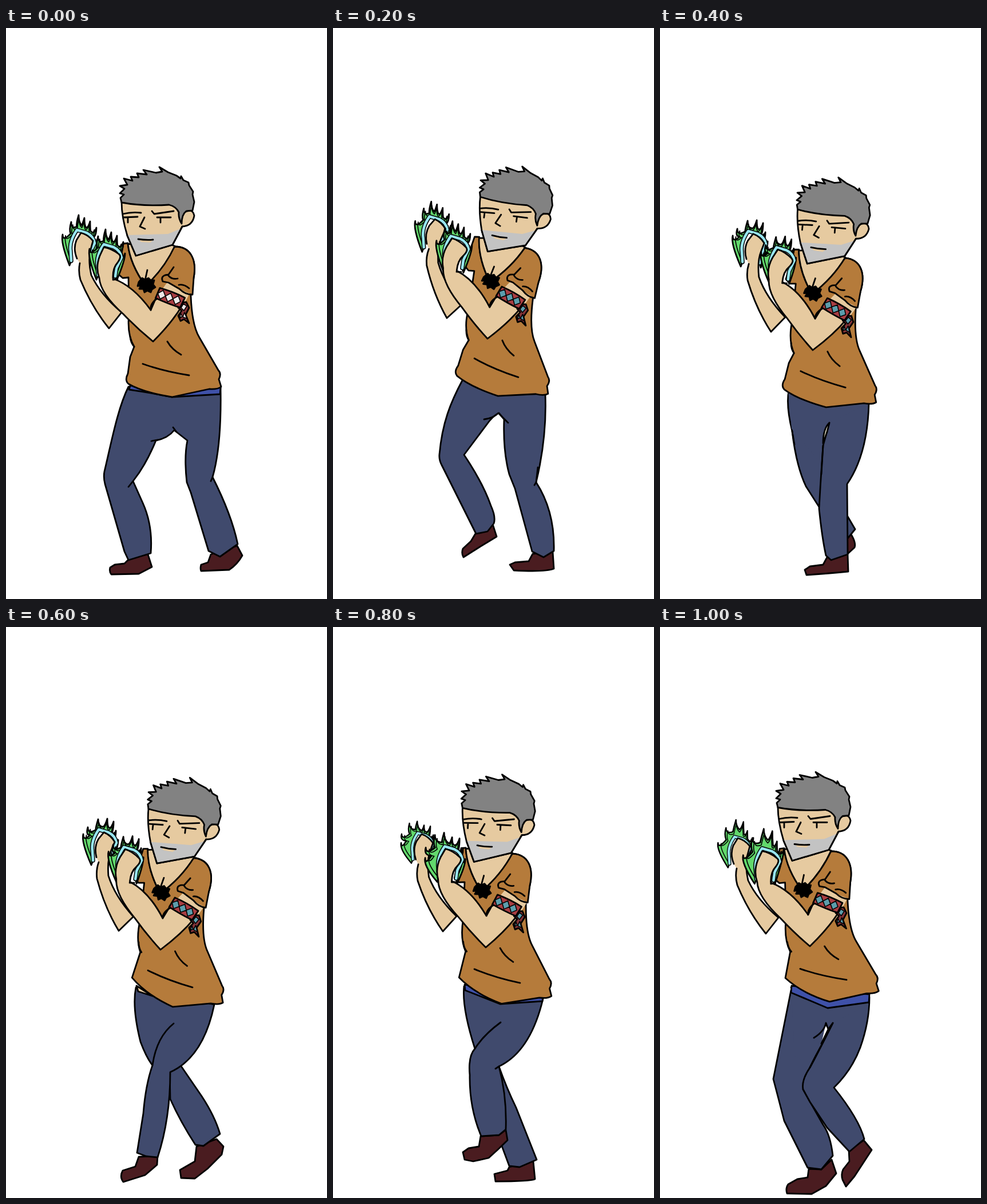
Animation of 561x998 px, one loop 1.2 s. Source, as an HTML page:

```html
<!DOCTYPE html>
<html lang="en">
<head>
<meta charset="utf-8">
<title>Sneaking mage</title>
<style>
html, body { margin: 0; height: 100%; overflow: hidden; background: #fff; }
svg { display: block; width: 100vw; height: 100vh; }
path { stroke: #000; stroke-width: 2.8; stroke-linejoin: round; stroke-linecap: round; }
.skin { fill: #e6caa0; }
.shirt { fill: #b57b3b; }
.jeans { fill: #404a6d; }
.shoe { fill: #4a1c20; }
.belt { fill: #3f51a8; }
.line { fill: none; }
.bare { stroke: none; }
.legs g { display: none; }
.flame :nth-child(1) { fill: #62d86c; }
.flame :nth-child(2) { fill: none; stroke-width: 1.7; }
.flame :nth-child(3) { fill: none; stroke-width: 7.5; }
.flame :nth-child(4) { fill: none; stroke: #98e6f0; stroke-width: 4.5; }
</style>
</head>
<body>
<svg viewBox="0 0 561 998">
  <g class="legs">
    <g>
      <path class="shoe" d="M217 926L248 920 255 942 232 954 184 955Q180 950 182 943L190 938 207 936Z"/>
      <path class="shoe" d="M358 920L404 905 413 922Q404 938 390 947L341 949Q339 945 341 938L353 934Z"/>
      <path class="jeans" d="M214 627C195 665 184 725 172 775Q170 785 173 797L207 915 214 930 253 918Q257 870 239 830L222 792Q245 763 262 721Q283 717 294 703L317 721Q311 750 316 794L323 812 354 914 374 924 405 902Q394 850 361 785Q377 730 375 628Z"/>
      <path class="belt" d="M217 625L215 632Q250 637 290 645L374 640 375 628Z"/>
      <path class="line" d="M292 698L298 706M222 792L214 802M254 722L264 720M361 785L358 792"/>
    </g>
    <g>
      <path class="shoe" d="M250 882L279 867 286 889 258 906 228 925Q224 918 227 910L241 897Z"/>
      <path class="shoe" d="M349 919L384 915 386 945Q372 951 316 948L309 938 318 934 342 932Z"/>
      <path class="jeans" d="M227 614C205 655 191 690 186 745Q185 755 190 764L250 884 270 880 281 866Q285 855 276 835Q262 795 229 746L274 686Q284 675 290 673L299 684Q297 740 308 780L318 805 348 915 368 925 386 914Q388 845 355 794Q374 715 371 640Z"/>
      <path class="line" d="M264 684Q280 682 289 673L306 690M355 794L352 799M358 768L355 794"/>
    </g>
    <g>
      <path class="shoe" d="M326 889L334 885Q343 900 340 908L328 919Z"/>
      <path class="jeans" d="M320 840L341 876 328 892ZM225 634Q220 660 231 705Q238 765 255 801L285 848 300 660Z"/>
      <path class="shoe" d="M292 925L328 920 329 950Q300 953 256 956L253 947 262 941 285 938Z"/>
      <path class="jeans bare" d="M224 634L365 655 350 720 280 760 230 700Z"/>
      <path class="jeans" d="M296 690L285 730Q281 785 278 840Q283 890 290 922L299 930 328 920 327 797Q363 745 365 655"/>
      <path d="M285 726Q285 700 296 690L292 706Z" fill="#d6d3bd"/>
      <path class="line" d="M231 705L235 728M285 730L282 780"/>
    </g>
    <g>
      <path class="shoe" d="M333 908L368 895 380 908 377 922 352 947 330 964 306 963 304 949 330 934Z"/>
      <path class="jeans" d="M286 775L305 766 342 820Q365 855 374 886L345 907 331 905Q305 865 287 825Z"/>
      <path class="shoe" d="M232 926L265 924 264 940 243 958 205 970Q198 961 204 950L226 943Z"/>
      <path class="jeans" d="M227 630Q220 665 235 725Q246 754 256 766Q244 800 240 850L229 919 245 925 265 927Q287 860 287 778Q345 752 364 660Z"/>
      <path class="skin" d="M228 627L231 637 256 645Z"/>
      <path class="line" d="M293 693Q263 717 256 766"/>
    </g>
    <g>
      <path class="shoe" d="M308 944L350 934 353 965Q345 969 284 969L282 956 305 950Z"/>
      <path class="jeans" d="M290 768Q303 805 320 840L356 931 326 944 308 942 285 880Z"/>
      <path class="shoe" d="M258 890L290 888 302 879 305 897Q290 912 272 928L245 934 230 931 227 918 237 911 255 908Z"/>
      <path class="jeans" d="M229 628Q225 665 248 737Q236 750 239 783Q238 840 259 890L290 888 302 878Q304 820 290 768Q345 742 367 650Z"/>
      <path class="belt" d="M230 625L231 635 292 659 366 654 367 645Z"/>
      <path class="line" d="M293 691Q263 713 248 737M290 768L284 772"/>
    </g>
    <g>
      <path class="shoe" d="M330 915L356 897 370 914 340 960 325 978 319 966Q316 957 320 948L331 934Z"/>
      <path class="shoe" d="M260 947L282 948 300 931 308 955 290 977 265 991 222 990Q219 981 224 974L240 965 258 962Z"/>
      <path class="jeans" d="M229 635Q212 720 198 790Q206 820 217 863L258 945 282 948 302 924Q298 888 285 870L250 808 262 770 300 690Z"/>
      <path class="jeans" d="M302 692Q278 740 262 770Q247 792 250 808L262 830 292 875 331 917 357 895Q348 860 304 805Q335 775 350 735Q366 690 366 647L229 630Z"/>
      <path class="jeans bare" d="M230 638L365 660 302 692 262 765 235 750Z"/>
      <path class="belt" d="M230 627L229 639 293 666 365 656 366 642Z"/>
      <path class="bare" d="M289 697L295 703 283 724Z" fill="#fff"/>
      <path class="line" d="M269 718Q287 707 290 692L294 703 302 692Q278 740 262 770M294 703L282 728"/>
    </g>
  </g>

  <g id="torso">
    <path id="shirt" class="shirt"/>
    <path class="skin" d="M213 378Q217 413 244 451Q277 420 295 381L260 370Z"/>
    <path class="line" d="M247 423L243 441M282 548Q290 562 306 571M239 587Q275 600 320 607M217 540Q218 550 224 557"/>
    <path d="M232 444L238 437 243 440 249 437 253 441 259 441 257 448 261 453 255 457 253 462 247 459 242 462 240 456 233 456 236 450 230 451Z"/>
  </g>

  <g id="backArm">
    <g class="flame"><path/><path/><path/><path/></g>
    <path class="skin" d="M124 403Q117 386 123 371L131 358Q143 361 152 372L148 387Q143 404 149 432Q165 466 202 497L180 525Q150 488 130 440Q126 425 129 411"/>
  </g>

  <g id="frontArm">
    <g class="flame"><path/><path/><path/><path/></g>
    <path class="skin bare" d="M262 472L285 440 323 460 305 495 262 540 248 500Z"/>
    <path class="skin" d="M163 437Q156 418 164 398L171 383Q184 385 197 395Q203 399 195 410Q186 420 187 438Q222 450 253 493L262 472 308 485Q290 515 257 548Q230 526 205 500Q165 464 163 437Z"/>
    <path class="line" d="M253 493Q251 482 265 472M187 440L195 439"/>
    <path d="M306 480L315 479 320 489 314 501 320 516 311 509 305 512 301 503 307 494 301 489Z" fill="#843438"/>
    <g transform="translate(288 472) rotate(20)">
      <path d="M-24 -10Q0 -12 23 -9L21 10Q0 11 -25 9Z" fill="#a83d42"/>
      <path class="gem" d="M-24 0l7 -8 7 8 -7 8zm14 0l7 -8 7 8 -7 8zm14 0l7 -8 7 8 -7 8z" style="stroke-width:1.6"/>
    </g>
    <path class="gem" d="M310 482L316 486 311 494 306 489ZM312 497L316 508 309 505ZM305 498L308 504 304 507Z" style="stroke-width:1.6"/>
  </g>

  <g id="sleeve">
    <path class="shirt bare" d="M298 384C322 382 334 404 328 437L326 466 304 457 284 445 274 443 274 433 284 430Z"/>
    <path class="line" d="M295 382C322 382 334 404 328 437L326 466Q313 466 303 456L284 445 274 443Q270 435 278 432L284 431 293 418M284 433Q290 440 300 438M302 449Q311 447 320 455"/>
  </g>

  <g id="head">
    <path class="skin" d="M312 322Q326 314 329 328Q326 346 308 347L291 379 227 398 212 363Q202 330 202 304L250 285 300 300Z"/>
    <path class="bare" d="M212 362L283 360 307 350 291 378 227 397Z" fill="#c3c3c3"/>
    <path class="line" d="M308 347L291 379 227 398 212 363"/>
    <path class="bare skin" d="M232 369L258 370 252 375 236 374Z"/>
    <path fill="#828282" d="M202 305L200 297 206 291 199 289 207 281 199 276 212 274 206 263 221 267 218 260 232 261 229 254 246 256 240 248 262 253 273 251 268 243 283 252 298 258 305 263 306 259 310 266 319 270 320 275 327 286 326 291 329 304 326 319 315 320Q307 326 307 342Q301 333 302 322Q297 312 285 309Q240 312 202 305Z"/>
    <path class="line" d="M204 325Q220 321 236 323M206 331L230 330M213 332V340M255 320L259 325 293 320M264 331H288M270 332V340M242 331L234 347 243 351M231 369Q244 371 257 370"/>
  </g>
</svg>
<script>
const $ = q => document.querySelector(q), $$ = q => document.querySelectorAll(q);

// Flame tips around the fist, clockwise from lower left.
const calm = [[-34, -12], [-19, -34], [-6, -46], [4, -41], [14, -35], [25, -24], [28, -4]];
const swept = [[-36, -12], [-28, -24], [-10, -38], [6, -39], [17, -34], [21, -18], [25, -2]];
const wide = [[-43, 0], [-42, -18], [-26, -40], [-10, -44], [4, -36], [17, -34], [23, -16], [27, 2]];
const tall = [[-42, -8], [-26, -38], [-6, -54], [9, -50], [17, -32], [29, -18]];

// head, torso, back arm and front arm: x, y, turn
const poses = [
  { head: [264, 320, 0], torso: [279.5, 597, 0], back: [180, 525, 0], front: [257, 548, 0], tips: calm },
  { head: [317, 318, 7.3], torso: [285.5, 594, 9.3], back: [199, 507, 9.5], front: [270, 543, 8.1], tips: calm },
  { head: [301, 337.5, 5], torso: [285, 614, 6.2], back: [194, 531, 6], front: [267, 563, 8.4], tips: swept },
  { head: [309, 339.5, 6.2], torso: [287, 615, 7], back: [197, 531, 7.8], front: [270, 564, 8.2], tips: swept, flat: true },
  { head: [287.5, 334.5, 3], torso: [287, 610, 3], back: [192, 532, 4], front: [267, 560, 5.3], tips: wide, flat: true, small: .85 },
  { head: [268, 330.5, 0], torso: [285.5, 607, -.5], back: [185, 536, 0], front: [262, 558, .9], tips: tall, flat: true, small: .87 }
];

const hems = {
  round: 'Q240 637 214 622Q207 616 213 604L217 575 224 557',
  flat: 'Q242 630 213 603L222 557'
};
const shirt = hem => `M295 382C322 382 334 404 328 437L323 468Q325 520 338 541L371 598Q377 604 372 614L376 627Q370 632 355 631L290 645${hem}Q211 535 215 500L214 436 204 437 196 430 205 377 213 376Q217 413 244 451Z`;

function place(id, [x, y, turn], ox, oy) {
  $(id).setAttribute('transform', `translate(${x} ${y}) rotate(${turn}) translate(${-ox} ${-oy})`);
}

// Wisps that all rise upwards, with valleys pulled in towards the fist.
function ridge(tips, k) {
  const at = (x, y) => `${(x * k).toFixed(1)} ${(y * k).toFixed(1)}`;
  const end = [13, 44];
  let d = 'M' + at(-22, 42);
  tips.forEach(([x, y], i) => {
    const next = tips[i + 1];
    const valley = next ? [(x + next[0]) * .38, (y + next[1]) * .36 + 3] : end;
    d += `Q${at(x - 4, y + 13)} ${at(x, y)}Q${at(x, y + 13)} ${at(...valley)}`;
  });
  return d;
}

const rim = 'M11 36L13 22 22 3Q20 -9 8 -15L-9 -20Q-23 0 -20 18L-19 34';

function flame(id, x, y, turn, tips, size) {
  const el = $(id + ' .flame');
  el.setAttribute('transform', `translate(${x} ${y}) rotate(${-turn}) scale(${size})`);
  const shapes = [ridge(tips, 1) + rim.replace('M', 'L') + 'Z', ridge(tips, .85), rim, rim];
  shapes.forEach((d, i) => el.children[i].setAttribute('d', d));
}

function show(n) {
  const p = poses[n];
  $$('.legs g').forEach((g, i) => g.style.display = i === n ? 'inline' : 'none');
  place('#head', p.head, 264, 320);
  place('#torso', p.torso, 279.5, 597);
  place('#sleeve', p.torso, 279.5, 597);
  place('#backArm', p.back, 180, 525);
  place('#frontArm', p.front, 257, 548);
  flame('#backArm', 133, 373, p.back[2], p.tips, p.small || 1);
  flame('#frontArm', 180, 398, p.front[2], p.tips, 1);
  $('#shirt').setAttribute('d', shirt(p.flat ? hems.flat : hems.round));
  $$('.gem').forEach(g => g.setAttribute('fill', n ? '#5c9dac' : '#eee8e8'));
}

let last = -1;
function tick() {
  const n = Math.floor(performance.now() / 200) % poses.length;
  if (n !== last) show(last = n);
  requestAnimationFrame(tick);
}
tick();
</script>
</body>
</html>
```
